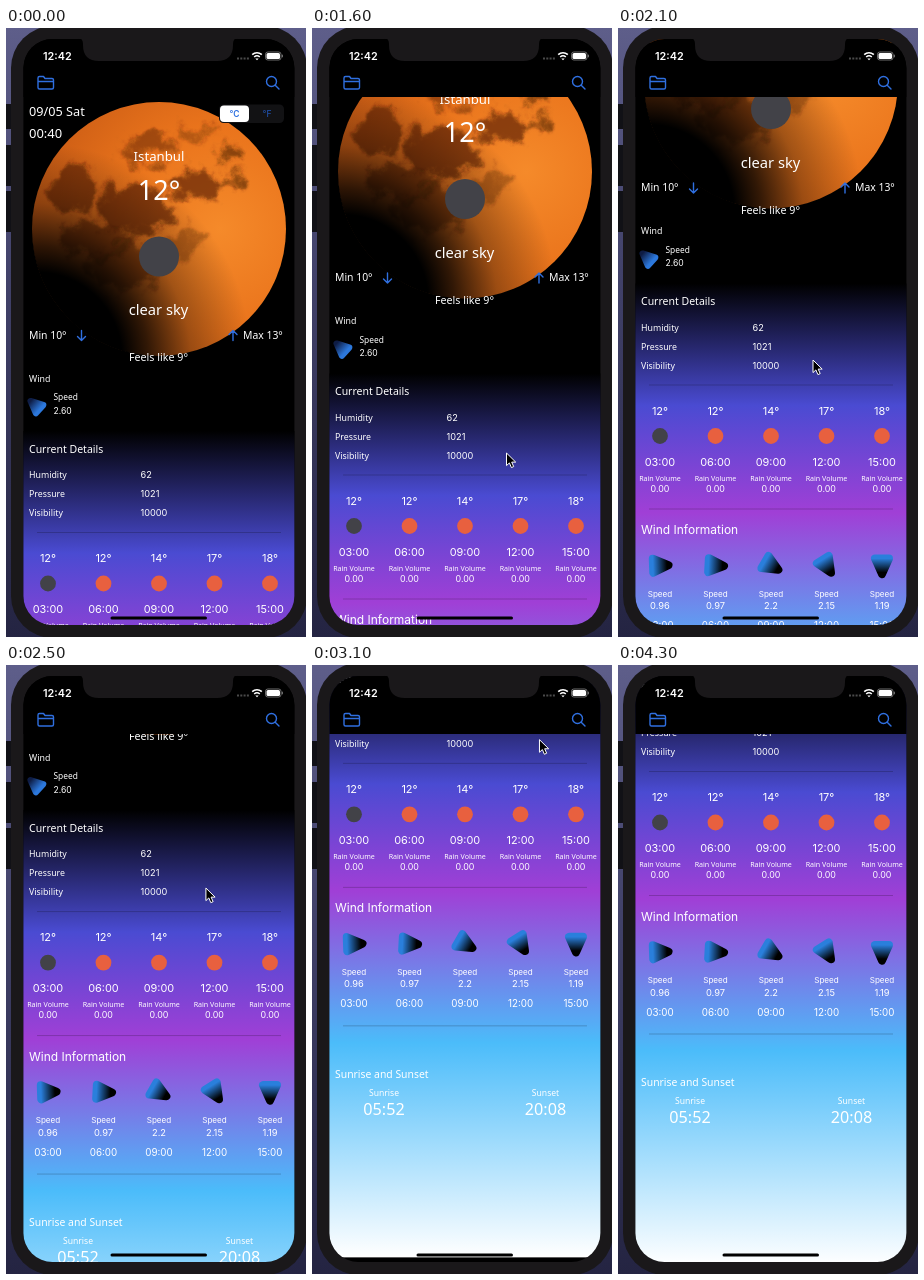
These frames come from a looping animation (300x609 px, 4400 ms). An HTML page:

```html
<!DOCTYPE html>
<html lang="en">
<head>
<meta charset="utf-8">
<title>Weather</title>
<style>
  html, body { margin: 0; width: 100%; height: 100%; overflow: hidden; background: #2a2a48; }
  svg { display: block; width: 300px; height: 609px; }
  text { fill: #fff; font-family: "Noto Sans", sans-serif; }
  .ui { font-family: Inter, sans-serif; }
  .mid { text-anchor: middle; }
  .line { fill: none; stroke: #2f6fe0; stroke-width: 1.4; stroke-linecap: round; stroke-linejoin: round; }
  .rule { stroke: #000; stroke-opacity: .2; }
</style>
</head>
<body>
<svg viewBox="0 0 300 609">
  <defs>
    <linearGradient id="desk" x2="0" y2="1">
      <stop stop-color="#5e5e8a"/><stop offset=".4" stop-color="#42426a"/><stop offset="1" stop-color="#242442"/>
    </linearGradient>
    <linearGradient id="sky" gradientUnits="userSpaceOnUse" x1="0" y1="403" x2="0" y2="998">
      <stop stop-color="#000"/><stop offset=".205" stop-color="#4a4bd2"/><stop offset=".385" stop-color="#a03fd6"/>
      <stop offset=".64" stop-color="#4bbcfa"/><stop offset="1" stop-color="#fff"/>
    </linearGradient>
    <radialGradient id="moon" cx=".74" cy=".5" r=".8">
      <stop stop-color="#f58a2a"/><stop offset=".5" stop-color="#ea741c"/><stop offset="1" stop-color="#c85a14"/>
    </radialGradient>
    <radialGradient id="shade" gradientUnits="userSpaceOnUse" cx="30" cy="330" r="215">
      <stop offset=".4" stop-color="#000"/><stop offset=".52" stop-color="#000" stop-opacity=".78"/>
      <stop offset=".72" stop-color="#000" stop-opacity=".32"/><stop offset="1" stop-color="#000" stop-opacity="0"/>
    </radialGradient>
    <linearGradient id="vane" x2="0" y2="1">
      <stop offset=".1" stop-color="#000"/><stop offset="1" stop-color="#2a7fdc"/>
    </linearGradient>
    <linearGradient id="vaneNow" x2="0" y2="1">
      <stop stop-color="#0e1c44"/><stop offset="1" stop-color="#2c78dc"/>
    </linearGradient>
    <filter id="rough" x="-20%" y="-20%" width="140%" height="140%">
      <feGaussianBlur stdDeviation="3" result="soft"/>
      <feTurbulence type="fractalNoise" baseFrequency=".045" numOctaves="4" seed="4"/>
      <feDisplacementMap in="soft" scale="38" xChannelSelector="R" yChannelSelector="G"/>
    </filter>
    <clipPath id="disc"><circle cx="153" cy="201" r="127"/></clipPath>
    <clipPath id="screen"><rect x="17.400" y="11" width="271" height="586" rx="29"/></clipPath>
  </defs>

  <rect width="300" height="609" fill="url(#desk)"/>
  <path d="M0 76h6v25H0zM0 117h6v41H0zM0 163h6v41H0z" fill="#111116"/>
  <rect x="5" y="-2" width="296" height="612" rx="42" fill="#1a181a"/>

  <g clip-path="url(#screen)">
    <rect x="17" y="11" width="272" height="586"/>
    <g id="page"></g>
    <rect x="17" y="11" width="272" height="58"/>
    <path class="line" d="M32 59V50q0-1.500 1.500-1.500h4l1.500 2h7q1.500 0 1.500 1.500v7.500q0 1.500-1.500 1.500H33.500q-1.500 0-1.500-1.500zM32 53.500h15.500"/>
    <path class="line" d="M260.500 53.500a5 5 0 1 0 10 0a5 5 0 1 0-10 0M269.200 57.200L273 61"/>
    <rect id="home" x="104.500" y="588.500" width="96.500" height="3" rx="1.500"/>
  </g>

  <path d="M72 10q5 0 5 6v1q0 16 16 16h118q16 0 16-16v-1q0-6 5-6z" fill="#1a181a"/>
  <text class="ui" x="37" y="32" font-size="10.800" font-weight="600">12:42</text>
  <path d="M231 30.500h12" stroke="#4a4a4a" stroke-width="1.800" stroke-dasharray="2 1.300"/>
  <path d="M246.200 26.700a7 7 0 0 1 9.600 0M248.200 29a4.200 4.200 0 0 1 5.600 0" fill="none" stroke="#fff" stroke-width="1.600"/>
  <path d="M249.300 30.400h3.400L251 32.200z" fill="#fff"/>
  <rect x="259.500" y="24" width="15.500" height="8" rx="2.300" fill="none" stroke="#888" stroke-width=".8"/>
  <rect x="260.500" y="25" width="13.500" height="6" rx="1.500" fill="#fff"/>
  <path d="M276.300 26.700v2.600" stroke="#888"/>

  <path id="cursor" d="M0 0v12.600l2.900-2.700 2 4.700 2.300-1-2-4.500H9.200z" stroke="#fff" stroke-linejoin="round"/>
</svg>

<script>
const LOOP = 4400, STEP = 100, PAGE_END = 998.5;
const $ = id => document.getElementById(id);

const text = (x, y, size, str, cls = '', extra = '') =>
  `<text x="${x}" y="${y}" font-size="${size}" class="${cls}" ${extra}>${str}</text>`;
const mid = (x, y, size, str, extra) => text(x, y, size, str, 'mid', extra);
const ui = (x, y, size, str, extra) => text(x, y, size, str, 'ui mid', extra);
const dot = (x, y, r, fill) => `<circle cx="${x}" cy="${y}" r="${r}" fill="${fill}"/>`;
const rule = y => `<path class="rule" d="M31 ${y}H275"/>`;
const vane = (x, y, turn, scale = 1, paint = 'vane') =>
  `<path transform="translate(${x} ${y}) rotate(${turn}) scale(${scale})" d="M0-8.500L7 7H-7z"
    fill="url(#${paint})" stroke="url(#${paint})" stroke-width="8" stroke-linejoin="round"/>`;

// Dark plains on the moon: x, y, rx, ry, opacity
const plains = [
  [68, 160, 22, 24, .55], [128, 182, 34, 26, .6], [88, 212, 30, 20, .5], [140, 120, 26, 14, .45],
  [190, 155, 28, 15, .6], [221, 124, 11, 9, .6], [229, 156, 9, 11, .6], [118, 240, 34, 22, .45],
  [175, 215, 18, 12, .35], [185, 105, 18, 8, .35]
].map(([x, y, rx, ry, o]) =>
  `<ellipse cx="${x}" cy="${y}" rx="${rx}" ry="${ry}" fill="#4a1a04" opacity="${o}"/>`).join('');

const moon = dot(153, 201, 127, 'url(#moon)') +
  `<g clip-path="url(#disc)"><g filter="url(#rough)">${plains}</g></g>` +
  dot(153, 201, 127.5, 'url(#shade)');

const now =
  text(23, 88, 12.7, '09/05 Sat') + text(23, 110, 13, '00:40') +
  `<rect x="213" y="76.500" width="65" height="18.500" rx="4.500" fill="#121214"/>
   <rect x="214" y="77.500" width="29" height="16.500" rx="4" fill="#fff"/>` +
  ui(228.5, 89, 8.5, '°C', 'font-weight="600" style="fill:#2b6fe0"') +
  ui(261, 89, 8.5, '°F', 'font-weight="500" style="fill:#1f4fa8"') +
  mid(153, 133, 13.2, 'Istanbul') + mid(153, 171.5, 27, '12°', 'font-weight="300"') +
  dot(153, 228.5, 20, '#424248') + mid(152.5, 287, 14.7, 'clear sky') +
  text(23, 310.5, 10.4, 'Min 10°') + text(237, 310.5, 10.4, 'Max 13°') +
  '<path class="line" d="M75.500 302.500v10M71.500 308.500l4 4 4-4M227 312.500v-10M223 306.500l4-4 4 4"/>' +
  mid(152.5, 333, 10.7, 'Feels like 9°') +
  text(23, 353.5, 8.8, 'Wind') + vane(29.5, 377.5, -48, .78, 'vaneNow') +
  text(47.5, 372, 8.4, 'Speed') + text(47.5, 385.5, 8.6, '2.60', 'ui');

const details = text(23, 424.5, 10.5, 'Current Details') +
  [['Humidity', 62], ['Pressure', 1021], ['Visibility', 10000]].map(([name, value], i) =>
    text(23, 450 + 19 * i, 8.8, name) + text(134.5, 450 + 19 * i, 9.2, value, 'ui')).join('') +
  rule(504.5);

const hours = [
  ['03:00', '12°', '0.96', 88], ['06:00', '12°', '0.97', 93], ['09:00', '14°', '2.2', 120],
  ['12:00', '17°', '2.15', 148], ['15:00', '18°', '1.19', 180]
].map(([time, temp, speed, turn], i) => {
  const x = 42 + 55.5 * i;
  return ui(x, 534, 11, temp) + dot(x, 555.5, 7.9, i ? '#e8603f' : '#424248') +
    ui(x, 585, 10.9, time) + mid(x, 600, 7.1, 'Rain Volume') + ui(x, 611, 8.9, '0.00') +
    vane(x, 685, turn) + ui(x, 716, 8.1, 'Speed') + ui(x, 728.5, 9.3, speed) + ui(x, 748.5, 9.8, time);
}).join('');

const sun = text(23, 819, 10.4, 'Sunrise and Sunset') +
  [[72, 'Sunrise', '05:52'], [233.5, 'Sunset', '20:08']].map(([x, name, time]) =>
    mid(x, 837, 8.6, name) + mid(x, 856, 16.2, time, 'font-weight="300"')).join('');

$('page').innerHTML =
  `<rect x="17" y="403" width="272" height="${PAGE_END - 403}" fill="url(#sky)"/>` +
  moon + now + details + hours + rule(628.5) + text(23, 653.5, 12, 'Wind Information', 'ui') + rule(767) + sun;

// Time, pointer x, pointer y, scroll
const path = [
  [0, 340, 560, 0], [600, 301, 540, 0], [1000, 210, 495, 0], [1200, 196, 484, 0], [1300, 196, 484, 0],
  [1600, 194.5, 425, 57.5], [2100, 195, 332, 147.5], [2800, 207.5, 141.5, 338.5], [3250, 240, 50, 420],
  [3500, 260, 26, 416.5], [3800, 305, -20, 401], [4300, 340, -40, 398], [LOOP, 340, -40, 398]
];

const slope = (i, k) => {
  const a = path[i], b = path[i + 1];
  return a && b ? (b[k] - a[k]) / (b[0] - a[0]) : 0;
};
const tangent = (i, k) => {
  const a = slope(i - 1, k), b = slope(i, k);
  return a * b > 0 ? 2 * a * b / (a + b) : 0;
};

// Monotone cubic through the path points
function at(t, k) {
  const i = path.findIndex((p, n) => n && t < p[0]) - 1;
  const [a, b] = [path[i], path[i + 1]], h = b[0] - a[0], u = (t - a[0]) / h, v = 1 - u;
  return v * v * (1 + 2 * u) * a[k] + u * u * (3 - 2 * u) * b[k] +
    h * u * v * (v * tangent(i, k) - u * tangent(i + 1, k));
}

const start = performance.now();
function draw() {
  const t = Math.floor((performance.now() - start) % LOOP / STEP) * STEP;
  const scroll = at(t, 3);
  $('page').setAttribute('transform', `translate(0 ${-scroll})`);
  $('cursor').setAttribute('transform', `translate(${at(t, 1)} ${at(t, 2)})`);
  $('home').setAttribute('fill', PAGE_END - scroll < 590 ? '#48484c' : '#000');
  requestAnimationFrame(draw);
}
draw();
</script>
</body>
</html>
```
